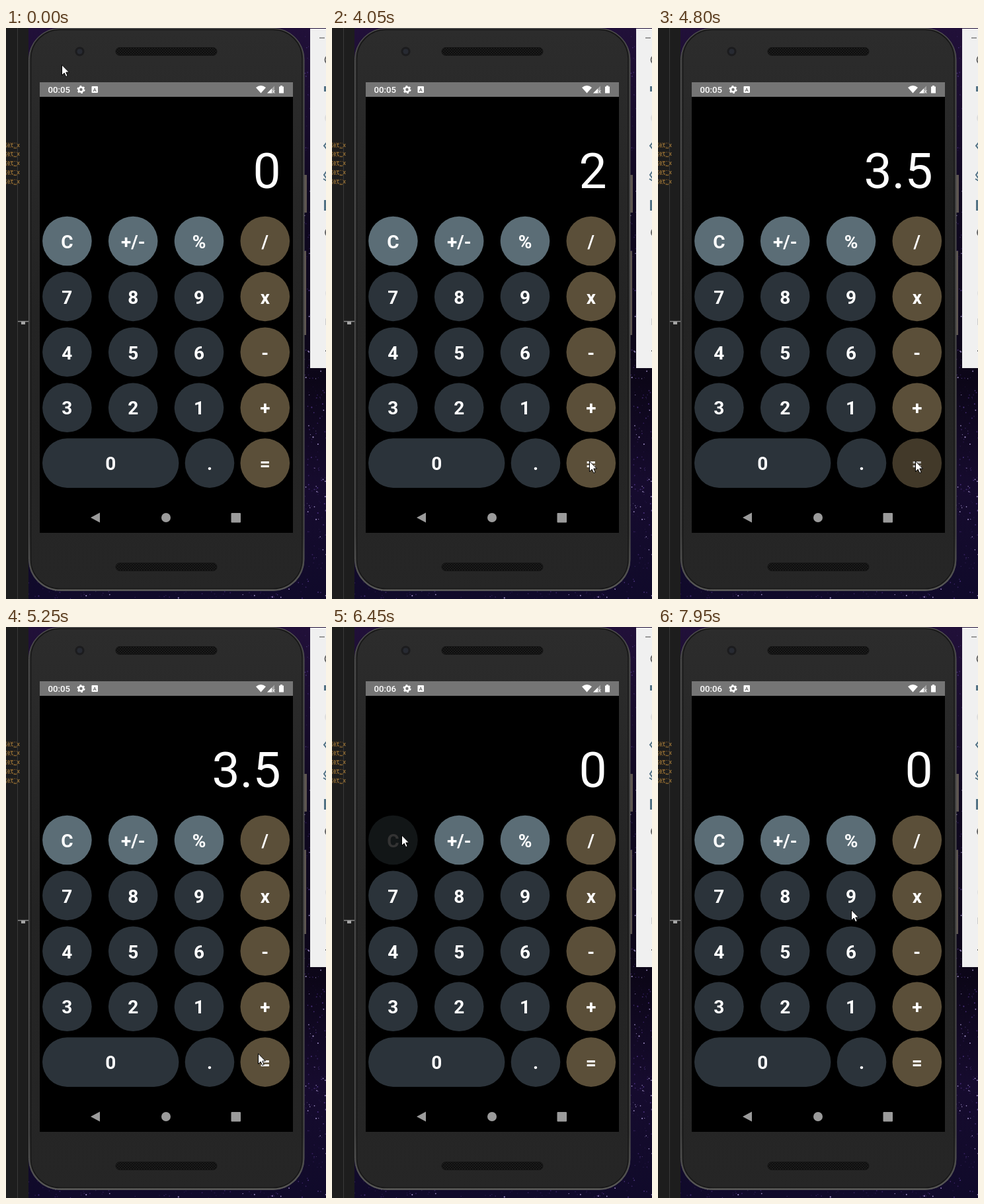
These frames come from a looping animation (484x863 px, 8 s). An HTML page:

```html
<!DOCTYPE html>
<html lang="en">
<head>
<meta charset="utf-8">
<title>Calculator</title>
<style>
  html, body { margin: 0; width: 100%; height: 100%; overflow: hidden; background: #0b0617; }
  svg { display: block; width: 484px; height: 863px; }
  text { font-family: Roboto, sans-serif; fill: #fff; }
  .key text { font-size: 28px; font-weight: 700; text-anchor: middle; }
  .code text { font: 700 8px "Noto Sans Mono", monospace; fill: #8c6a35; }
</style>
</head>
<body>
<svg viewBox="0 0 484 863">
  <defs>
    <linearGradient id="space" x2="0" y2="1">
      <stop offset="0" stop-color="#211039"/>
      <stop offset=".3" stop-color="#0f0820"/>
      <stop offset=".62" stop-color="#0c0618"/>
      <stop offset=".8" stop-color="#160b2e"/>
      <stop offset="1" stop-color="#100a2a"/>
    </linearGradient>
    <linearGradient id="rim" x2="0" y2="1">
      <stop offset="0" stop-color="#3c3c3c"/>
      <stop offset=".9" stop-color="#343434"/>
      <stop offset="1" stop-color="#5a5a58"/>
    </linearGradient>
    <linearGradient id="face" x2="0" y2="1">
      <stop offset="0" stop-color="#2c2c2c"/>
      <stop offset=".5" stop-color="#232323"/>
      <stop offset="1" stop-color="#262626"/>
    </linearGradient>
    <pattern id="mesh" width="4" height="4" patternUnits="userSpaceOnUse">
      <rect width="4" height="4" fill="#1b1b1b"/>
      <path d="M0 0h2v2H0zM2 2h2v2H2z" fill="#0e0e0e"/>
    </pattern>
  </defs>

  <rect width="484" height="863" fill="url(#space)"/>
  <g id="stars"></g>

  <!-- editor strip -->
  <rect width="34" height="863" fill="#1d1d1d"/>
  <path d="M17.5 0V863" stroke="#3a3a3a"/>
  <g id="code" class="code"></g>
  <path d="M18 443.500H34" stroke="#8f8f8f" stroke-width="1.500"/>
  <path d="M23 444h6v4h-6z" fill="#a5a5a5"/>

  <!-- emulator toolbar -->
  <rect x="460" y="1" width="24" height="513" fill="#f0f0f0"/>
  <g fill="none" stroke="#666" stroke-width="2">
    <path d="M474 15h8" stroke="#999"/>
    <circle cx="489" cy="48" r="6.500"/>
    <path d="M482 89h2v6h-2z" fill="#527285" stroke="#527285"/>
    <circle cx="489" cy="136" r="6" stroke="#ddd"/>
    <path d="M486 172l-5 6 5 6" stroke="#527285"/>
    <path d="M486 215l-5 7 5 7M480 228l5 3" stroke="#527285"/>
    <path d="M482 261h4v14h-4z" fill="#527285" stroke="#527285"/>
    <circle cx="489" cy="309" r="6"/>
    <circle cx="490" cy="401" r="6" stroke="#ddd"/>
    <path d="M484 439v10" stroke="#ccc"/>
    <path d="M483 488h3"/>
  </g>

  <!-- phone -->
  <path d="M451 222h4v57h-4zM451 337h3v127h-3z" fill="#5d5550"/>
  <rect x="34.500" y=".5" width="416.500" height="850" rx="47" fill="url(#rim)" stroke="#555"/>
  <rect x="37.500" y="2.500" width="410.500" height="845" rx="44" fill="url(#face)" stroke="#171717" stroke-width="1.500"/>
  <circle cx="111.500" cy="35.500" r="7" fill="#1c1c1e"/>
  <circle cx="111.500" cy="35.500" r="4" fill="#272a32"/>
  <g fill="url(#mesh)" stroke="#151515">
    <rect x="166" y="29.500" width="153" height="12" rx="6"/>
    <rect x="166" y="808.500" width="153" height="12" rx="6"/>
  </g>
  <rect x="51" y="82" width="383" height="681"/>

  <!-- status bar -->
  <rect x="51" y="82" width="383" height="22" fill="#757575"/>
  <text id="clock" x="63.500" y="98" font-size="13.200" font-weight="500"></text>
  <circle cx="113.500" cy="93" r="3.500" fill="none" stroke="#fff" stroke-width="2.600"/>
  <circle cx="113.500" cy="93" r="5.200" fill="none" stroke="#fff" stroke-width="1.800" stroke-dasharray="2.700 2.745"/>
  <rect x="129.500" y="88" width="9.500" height="10" rx="1" fill="#fff"/>
  <text x="134.200" y="96" font-size="8" font-weight="700" text-anchor="middle" style="fill:#757575">A</text>
  <path d="M378 90q7.500-6 15 0l-7.500 8.500z" fill="#fff"/>
  <path d="M395 98.500L406 87.500V98.500z" fill="#a6a6a6"/>
  <path d="M395 98.500L402 91.500V98.500z" fill="#fff"/>
  <path d="M403 94l3.500 4.500m0-4.500l-3.500 4.500" stroke="#eee"/>
  <path d="M413 88.500h2v-1.500h3v1.500h2v10h-7z" fill="#fff"/>

  <text id="display" x="415.600" y="242" font-size="75" text-anchor="end"></text>
  <g id="keys"></g>

  <!-- navigation -->
  <g fill="#9b9b9b">
    <path d="M128 740L142 732.500V747.500z"/>
    <circle cx="242" cy="740" r="7"/>
    <rect x="340.500" y="733" width="14.500" height="14.500" rx="1"/>
  </g>

  <path id="cursor" d="M.5 .8V16.500L4.200 13 6.700 18.500 9.200 17.500 6.800 12H11.500z" fill="#fff" stroke="#000"/>
</svg>
<script>
const LOOP = 8000, STEP = 50;
const $ = id => document.getElementById(id);

function add(parent, tag, attrs, content = '') {
  const el = document.createElementNS('http://www.w3.org/2000/svg', tag);
  for (const name in attrs) el.setAttribute(name, attrs[name]);
  el.textContent = content;
  parent.append(el);
  return el;
}

let seed = 7;
const random = () => (seed = seed * 16807 % 2147483647) / 2147483647;
for (let i = 0; i < 420; i++) {
  const side = random() < .75;
  add($('stars'), 'circle', {
    cx: side ? 451 + random() * 33 : 34 + random() * 417,
    cy: side ? random() * 863 : 835 + random() * 28,
    r: .4 + random() * .7,
    fill: ['#35205c', '#48307a', '#241544', '#9d8cc4'][Math.floor(random() ** 1.5 * 4)]
  });
}

for (let row = 0; row < 5; row++) {
  const y = 179.5 + row * 13.8;
  add($('code'), 'text', { x: -3, y }, 'set_x');
  add($('code'), 'path', { d: `M0 ${y - 5.5}H16M0 ${y + .5}H16`, stroke: '#705126', 'stroke-dasharray': '2 1' });
}

const SLATE = '#5b6d76', DARK = '#2b333a', BROWN = '#5b4f39';
const keys = {};
function addKey(label, x, row, color, width = 74.6) {
  const y = 322 + row * 83.9;
  const group = keys[label] = add($('keys'), 'g', { class: 'key' });
  add(group, 'rect', { x: x - width / 2, y: y - 37.3, width, height: 74.6, rx: 37.3, fill: color });
  add(group, 'text', { x, y: y + 10.7 }, label);
}
['C +/- % /', '7 8 9 x', '4 5 6 -', '3 2 1 +'].forEach((line, row) =>
  line.split(' ').forEach((label, col) =>
    addKey(label, 92.4 + col * 99.8, row, col === 3 ? BROWN : row ? DARK : SLATE)));
addKey('0', 158.2, 4, DARK, 206.4);
addKey('.', 308, 4, DARK);
addKey('=', 391.8, 4, BROWN);

// time, x, y; a fourth value makes the pointer glide to the point
const pointer = [
  [0, 84, 55], [50, 82, 108], [100, 79, 161], [4050, 389, 654],
  [5200, 389, 658], [5300, 372, 630, 1], [5400, 305, 540, 1], [5500, 210, 425, 1],
  [5600, 138, 340, 1], [5650, 118, 319, 1], [5700, 110, 315, 1], [5750, 106, 314, 1],
  [6100, 105, 314], [7050, 113, 317], [7150, 135, 338, 1], [7250, 168, 378, 1],
  [7350, 196, 412, 1], [7400, 198, 414, 1], [7900, 245, 412], [7950, 292, 427]
];

function pointerAt(time) {
  const i = pointer.findLastIndex(p => p[0] <= time);
  const [t0, x0, y0] = pointer[i];
  const next = pointer[i + 1];
  if (!next || !next[3]) return [x0, y0];
  const k = (time - t0) / (next[0] - t0);
  return [x0 + (next[1] - x0) * k, y0 + (next[2] - y0) * k].map(Math.round);
}

const pressOpacity = age => age < 0 || age >= 450 ? 1 : age < 300 ? .2 : .73;

function frame() {
  const now = performance.now() % LOOP;
  const time = Math.floor(now / STEP) * STEP;
  $('cursor').setAttribute('transform', `translate(${pointerAt(time)})`);
  $('display').textContent = time < 4050 || time >= 6450 ? '0' : time < 4650 ? '2' : '3.5';
  $('clock').textContent = time < 6300 ? '00:05' : '00:06';
  keys['='].setAttribute('opacity', pressOpacity(time - 4500));
  keys.C.setAttribute('opacity', pressOpacity(time - 6300));
  requestAnimationFrame(frame);
}
frame();
</script>
</body>
</html>
```
